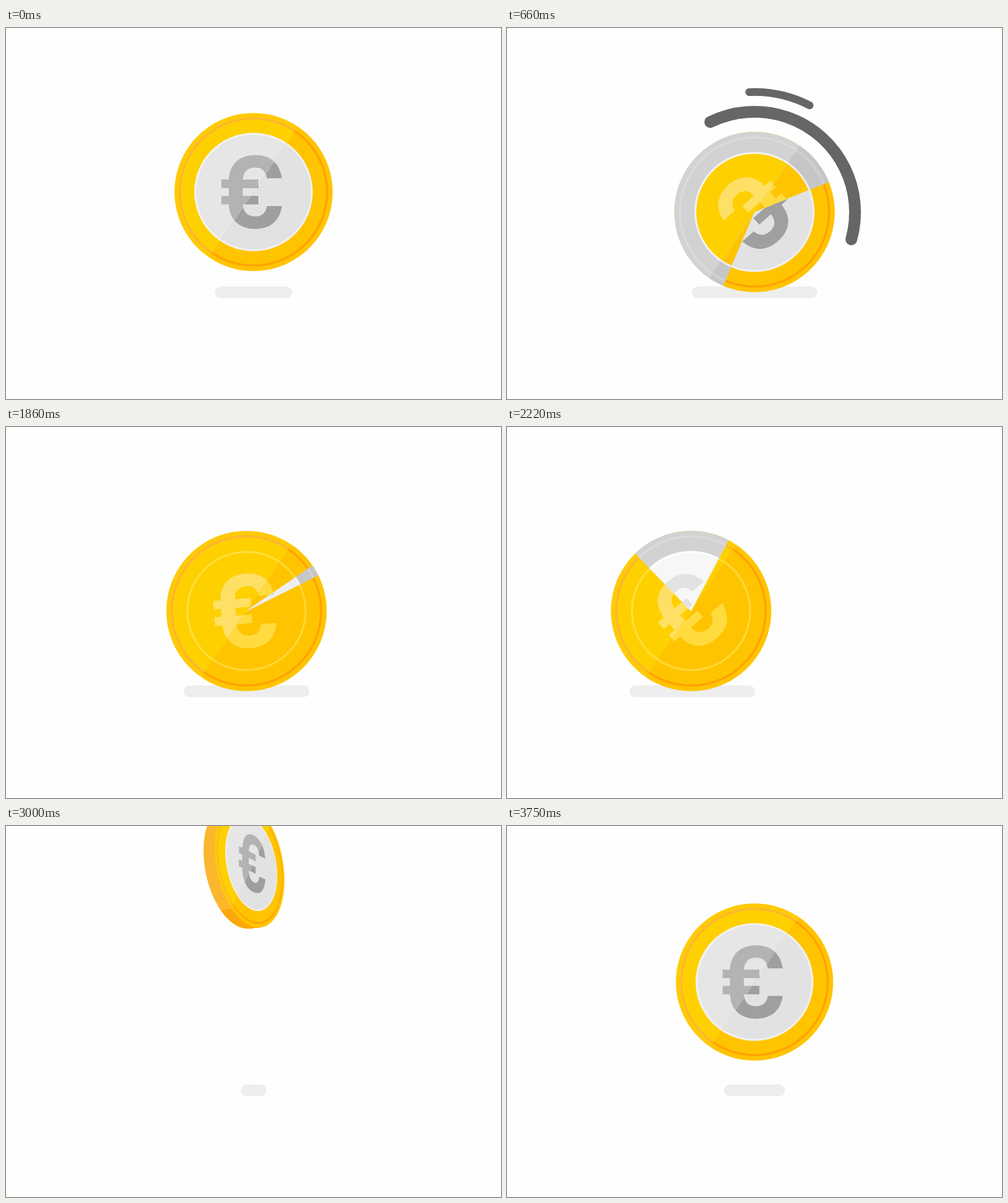
An HTML page with a canvas that plays this animation: 800x600 px, repeating every 3780 ms.

```html
<!DOCTYPE html>
<html lang="en">
<head>
<meta charset="utf-8">
<title>Coin</title>
<style>
  html, body { margin: 0; width: 100%; height: 100%; overflow: hidden; background: #fefefe; }
  canvas { display: block; }
</style>
</head>
<body>
<canvas id="stage" width="800" height="600"></canvas>
<script>
const ctx = document.getElementById('stage').getContext('2d');
const LOOP = 3780, R = 129.5, GROUND = 427, CAMERA = 713, THICK = 25;
const RAD = Math.PI / 180;
const clamp = (v, a = 0, b = 1) => Math.min(b, Math.max(a, v));

// Each face has a lit and a shaded palette.
const face = (rim, body, ring, line, center, sign) =>
  [0, 1].map(i => ({ rim: rim[i], body: body[i], ring: ring[i], line: line[i], center: center[i], sign: sign[i] }));
const gold = ['#ffd000', '#ffc400'], goldRim = ['#ffca05', '#ffc400'], goldRing = ['#fbb72f', '#ffa200'];
const silver = ['#d2d2d2', '#c6c6c6'], silverRing = ['#dadada', '#d0d0d0'];
const FACES = [
  face(goldRim, gold, goldRing, ['#f3f3f3', '#f1f1f1'], ['#e6e6e6', '#e2e2e2'], ['#b3b3b3', '#9f9f9f']),
  face(silver, silver, silverRing, ['#f3f3f3', '#eeeeee'], gold, ['#ffe066', '#ffdb40']),
  face(goldRim, gold, goldRing, ['#ffdf40', '#ffd83a'], gold, ['#ffe066', '#ffdb40']),
  face(silver, silver, silverRing, ['#ffffff', '#f6f6f6'], ['#f7f7f7', '#eeeeee'], ['#e2e2e2', '#d6d6d6'])
];

// Upper half of the letter's outline; the lower half mirrors it.
const SIGN = [
  [46.5, -22.5], [43, -47, 28, -60.5, 3, -60.5], [-25, -60.5, -40.5, -44, -40.5, -17],
  [-40.5, 17], [-40.5, 44, -25, 60.5, 3, 60.5], [28, 60.5, 43, 47, 46.5, 23],
  [22, 23], [20, 34, 14, 40, 3, 40], [-10, 40, -17.5, 33, -17.5, 17],
  [-17.5, -17], [-17.5, -33, -10, -40, 3, -40], [14, -40, 20, -34, 22, -22.5]
];

// Coin space to stage, with tilt and perspective.
function projector({ x, y, scale, tiltX, tiltY }) {
  const ca = Math.cos(tiltX), sa = Math.sin(tiltX), cb = Math.cos(tiltY), sb = Math.sin(tiltY);
  return (px, py, pz = 0) => {
    const u = cb * px + sb * pz, d = cb * pz - sb * px;
    const v = ca * py - sa * d, depth = (sa * py + ca * d) * scale;
    const k = scale * CAMERA / (CAMERA - depth);
    return [x + u * k, y + v * k];
  };
}

function poly(points) {
  points.forEach((p, i) => i ? ctx.lineTo(...p) : ctx.moveTo(...p));
  ctx.closePath();
}

function disc(proj, r, color, z = 0) {
  ctx.beginPath();
  poly(Array.from({ length: 120 }, (_, i) => proj(r * Math.cos(i * 3 * RAD), r * Math.sin(i * 3 * RAD), z)));
  ctx.fillStyle = color;
  ctx.fill();
}

function sign(proj, rot, color) {
  const c = Math.cos(rot), s = Math.sin(rot);
  const at = (x, y) => proj(x * c - y * s, x * s + y * c);
  ctx.fillStyle = color;
  ctx.beginPath();
  SIGN.forEach((q, i) => {
    const p = [];
    for (let j = 0; j < q.length; j += 2) p.push(...at(q[j], q[j + 1]));
    if (!i) ctx.moveTo(...p);
    else if (p.length === 2) ctx.lineTo(...p);
    else ctx.bezierCurveTo(...p);
  });
  ctx.closePath();
  ctx.fill();
  for (const [top, bottom] of [[-20.5, -6.3], [6.3, 20.3]]) {
    ctx.beginPath();
    poly([at(-52.5, top), at(8, top), at(8, bottom), at(-52.5, bottom)]);
    ctx.fill();
  }
}

function clipped(points, draw) {
  ctx.save();
  ctx.beginPath();
  poly(points);
  ctx.clip();
  draw();
  ctx.restore();
}

// Runs draw for the lit side, then again for the shaded half.
function split(proj, z, draw) {
  draw(0);
  const dx = Math.sin(34.2 * RAD) * 160, dy = -Math.cos(34.2 * RAD) * 160;
  const half = [[dx, dy], [dx - dy, dy + dx], [-dx - dy, -dy + dx], [-dx, -dy]];
  clipped(half.map(p => proj(p[0], p[1], z)), () => draw(1));
}

function drawFace(proj, sides, rot) {
  split(proj, 0, i => {
    const c = sides[i];
    disc(proj, R, c.rim);
    disc(proj, 122.3, c.ring);
    disc(proj, 118.8, c.body);
    disc(proj, 97, c.line);
    disc(proj, 94, c.center);
    sign(proj, rot, c.sign);
  });
}

// Shows a face inside a wedge that opens anticlockwise from `start` (degrees from the top).
function wipe(proj, sides, rot, start, sweep) {
  if (sweep <= 0) return;
  if (sweep >= 360) return drawFace(proj, sides, rot);
  const points = [proj(0, 0)], n = Math.ceil(sweep / 10);
  for (let i = 0; i <= n; i++) {
    const a = (start - sweep * i / n) * RAD;
    points.push(proj(Math.sin(a) * 160, -Math.cos(a) * 160));
  }
  clipped(points, () => drawFace(proj, sides, rot));
}

function drawEdge(proj) {
  for (let z = -THICK; z < 0; z++) {
    split(proj, z, i => disc(proj, R, goldRing[i], z));
  }
}

// Height of the coin above the ground: one fall and two bounces.
function height(u) {
  const fall = (peak, top) => top - 0.0029 * (u - peak) ** 2;
  if (u < 3146) return fall(2760, 432);
  if (u < 3544) return Math.max(0, fall(3345, 114.8));
  if (u < 3831) return Math.max(0, fall(3687.5, 59.4));
  return 0;
}

function shadow(x, w) {
  if (w <= 0) return;
  ctx.fillStyle = '#eeeeee';
  ctx.beginPath();
  ctx.roundRect(x - w / 2, 418, w, 19, Math.min(9.5, w / 2));
  ctx.fill();
}

// Two-part travel through `mid` at 660 ms.
function travel(t, t0, t1, from, mid, to, pIn, pOut) {
  return t < 660
    ? from + (mid - from) * clamp((t - t0) / (660 - t0)) ** pIn
    : to - (to - mid) * (1 - clamp((t - 660) / (t1 - 660))) ** pOut;
}

function streak(radius, width, tail, lead) {
  if (lead - tail < 0.2) return;
  ctx.beginPath();
  ctx.arc(400, 298, radius, (-90 - lead) * RAD, (-90 - tail) * RAD);
  ctx.lineWidth = width;
  ctx.lineCap = 'round';
  ctx.strokeStyle = '#666666';
  ctx.stroke();
}

function render(t) {
  ctx.fillStyle = '#fefefe';
  ctx.fillRect(0, 0, 800, 600);
  if (t >= 2580 && t < 2760) return;

  const u = t < 2700 ? t + LOOP : t;
  const h = height(u);
  const scale = 1 - 0.115 * (Math.max(0, 3870 - u) / 540) ** 1.18;
  const turn = (Math.max(0, 3720 - u) / 390) ** 1.2;
  const away = t < 2700 ? 102 * (Math.max(0, t - 724) / 1496) ** 8 : 0;
  const roll = t > 1240 && t < 2700 ? away : 0;

  const near = clamp((432 - h) / 300);
  shadow(400 - roll * 0.98, (74 + 129 * Math.max(0, 1 - h / 65) ** 1.252) * near);

  const proj = projector({
    x: 400 - roll, y: GROUND - h - R * scale, scale,
    tiltX: 8.5 * RAD * turn, tiltY: 27.6 * RAD * turn
  });
  if (turn > 0) drawEdge(proj);

  if (t >= 2700) {
    drawFace(proj, FACES[0], 0);
  } else if (t < 1247) {
    const x = clamp((t - 227) / 1020);
    const spin = 720 * (x < 0.5 ? 4 * x ** 3 : 1 - 4 * (1 - x) ** 3);
    const rot = -spin * RAD;
    const first = spin * 223 / 220, second = spin - 360;
    if (second < 360) {
      if (first < 360) drawFace(proj, FACES[0], rot);
      wipe(proj, FACES[1], rot, 68, first);
    }
    wipe(proj, FACES[2], rot, 68, second);
  } else {
    const deg = roll * 0.392;
    drawFace(proj, FACES[2], -deg * RAD);
    wipe(proj, FACES[3], -deg * RAD, 68 - deg, deg * 1.79);
  }

  if (t > 480 && t < 1110) {
    streak(162.5, 19, travel(t, 480, 1110, -170, -106.6, 322, 2, 1), travel(t, 480, 1095, -170, 25, 322, 1, 1.6));
  }
  if (t > 495 && t < 1070) {
    streak(194.5, 12.5, travel(t, 495, 1070, -166, -28.3, 200, 1.3, 1.9), travel(t, 495, 1050, -166, 1.5, 200, 1, 2));
  }
}

const begin = performance.now();
function tick() {
  render((performance.now() - begin) % LOOP);
  requestAnimationFrame(tick);
}
tick();
</script>
</body>
</html>
```
